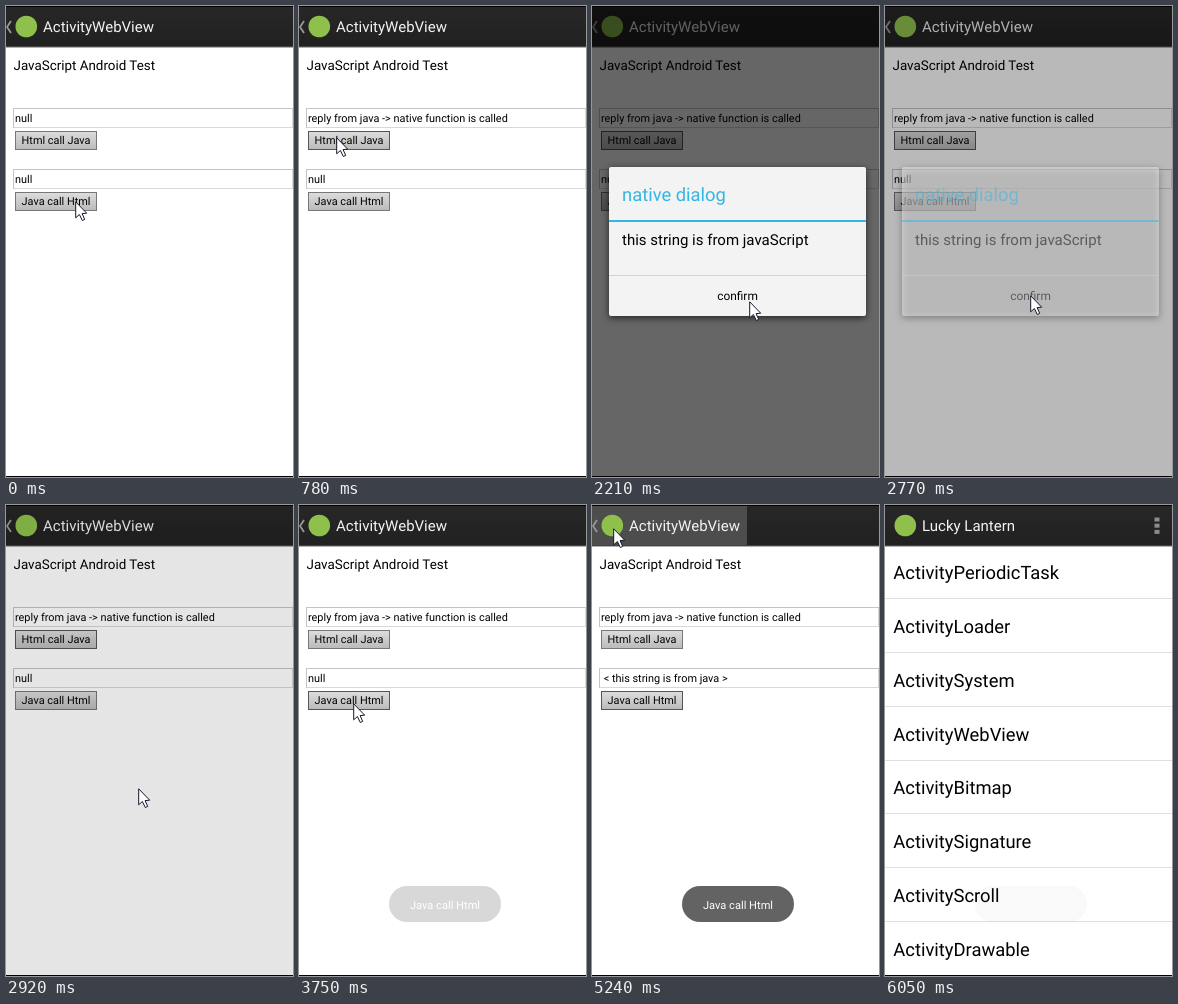
An HTML page with a canvas for the animation above (6.33 s loop, 287 by 471 pixels).

```html
<!DOCTYPE html>
<html lang="en">
<head>
<meta charset="utf-8">
<title>WebView bridge demo</title>
<style>
  html, body { margin: 0; width: 100%; height: 100%; overflow: hidden; background: #fff; }
  canvas { display: block; width: 287px; height: 471px; }
</style>
</head>
<body>
<canvas id="stage" width="287" height="471"></canvas>
<script>
const W = 287, H = 471, LOOP = 6330, STEP = 120;
const ctx = document.getElementById('stage').getContext('2d');
ctx.textRendering = 'geometricPrecision';

const activities = ['PeriodicTask', 'Loader', 'System', 'WebView', 'Bitmap', 'Signature', 'Scroll', 'Drawable'];

// Where the pointer rests, when it sets off for that place and in how many hops
const home = { x: 69, y: 195 };
const moves = [
  { at: 120, hops: 2, x: 37, y: 131 },
  { at: 1670, hops: 2, x: 175, y: 289 },
  { at: 1940, hops: 3, x: 157, y: 295 },
  { at: 2770, hops: 2, x: 132, y: 283 },
  { at: 3070, hops: 3, x: 54, y: 198 },
  { at: 4570, hops: 3, x: 9, y: 46 },
  { at: 4960, hops: 1, x: 21, y: 23 },
  { at: 5540, hops: 2, x: 238, y: 421 }
];

// Rises from 0 to 1 in equal steps, the first one taken at `start`
function ramp(t, start, steps) {
  const taken = Math.floor((t - start) / STEP) + 1;
  return Math.min(1, Math.max(0, taken / steps));
}

function pointerAt(t) {
  let { x, y } = home;
  for (const move of moves) {
    const p = ramp(t, move.at, move.hops);
    x += (move.x - x) * p;
    y += (move.y - y) * p;
  }
  return [Math.round(x), Math.round(y)];
}

function rect(x, y, w, h, fill) {
  ctx.fillStyle = fill;
  ctx.fillRect(x, y, w, h);
}

function roundRect(x, y, w, h, radius, fill) {
  ctx.beginPath();
  ctx.roundRect(x, y, w, h, radius);
  ctx.fillStyle = fill;
  ctx.fill();
}

function text(str, x, baseline, size, fill = '#000', align = 'left') {
  ctx.font = `${size}px Roboto, sans-serif`;
  ctx.textAlign = align;
  ctx.fillStyle = fill;
  ctx.fillText(str, x, baseline);
}

function gradient(y, h, top, bottom) {
  const g = ctx.createLinearGradient(0, y, 0, y + h);
  g.addColorStop(0, top);
  g.addColorStop(1, bottom);
  return g;
}

function polyline(points) {
  ctx.beginPath();
  points.forEach(([x, y]) => ctx.lineTo(x, y));
}

function header(title, pressed) {
  rect(0, 0, W, 1, '#000');
  rect(0, 1, W, 39, gradient(1, 39, '#272727', '#212121'));
  rect(0, 40, W, 1, '#444');
  rect(0, 41, W, 1, '#b0b0b0');
  if (pressed) rect(0, 1, 155, 39, '#4d4d4d');
  text(title, 37, 26, 15, '#f3f3f3');
  ctx.beginPath();
  ctx.arc(20.3, 20.5, 10.8, 0, Math.PI * 2);
  ctx.fillStyle = '#8fc04c';
  ctx.fill();
}

function input(y, value) {
  rect(7, y, 280, 20, '#d8d8d8');
  rect(7, y, 280, 1, '#c4c4c4');
  rect(7, y, 1, 20, '#c4c4c4');
  rect(8, y + 1, 278, 18, '#fff');
  text(value, 9, y + 14, 10.9);
}

function button(y, label, focused) {
  rect(9, y, 82, 19, focused ? '#555' : '#777');
  rect(10, y + 1, 80, 17, gradient(y, 19, '#dedede', '#b9b9b9'));
  text(label, 50, y + 13.4, 10.9, '#000', 'center');
}

function webPage(t) {
  header('ActivityWebView', t >= 5240);
  polyline([[5, 15], [1, 21], [5, 27]]);
  ctx.strokeStyle = '#999';
  ctx.lineWidth = 1.8;
  ctx.stroke();

  text('JavaScript Android Test', 7.5, 64, 13.4);
  input(102, t < 780 ? 'null' : 'reply from java -> native function is called');
  button(125, 'Html call Java', t >= 780 && t < 3750);
  input(163, t < 3900 ? 'null' : ' < this string is from java >');
  button(186, 'Java call Html', t >= 3750);
}

function listPage() {
  header('Lucky Lantern');
  for (let i = 0; i < 3; i++) rect(269.5, 12.5 + i * 6.2, 5, 4, '#8c8c8c');
  activities.forEach((name, i) => {
    const offset = i * 53.85;
    text('Activity' + name, 8.3, 74 + offset, 18.4);
    rect(0, Math.round(93 + offset), W, 1, '#e0e0e0');
  });
}

function dialog(alpha) {
  ctx.save();
  ctx.globalAlpha = alpha;
  ctx.shadowColor = 'rgba(0,0,0,.65)';
  ctx.shadowBlur = 7;
  ctx.shadowOffsetY = 2;
  roundRect(17, 161, 257, 149, 2, '#f3f3f3');
  ctx.shadowColor = 'transparent';
  text('native dialog', 30, 195, 18.4, '#33b5e5');
  rect(17, 214, 257, 2, '#33b5e5');
  text('this string is from javaScript', 30, 239, 15);
  rect(17, 269, 257, 1, '#d2d2d2');
  text('confirm', 145.5, 294, 11.9, '#000', 'center');
  ctx.restore();
}

// The label stays white while the pill is still pale
function toast(alpha) {
  ctx.save();
  ctx.globalAlpha = alpha;
  roundRect(90, 381, 112, 36, 18, '#636363');
  ctx.globalAlpha = Math.min(1, alpha * 4);
  text('Java call Html', 146, 403.5, 11.1, '#fff', 'center');
  ctx.restore();
}

function pointer(x, y) {
  ctx.save();
  ctx.translate(x + .7, y + .8);
  polyline([[0, 0], [0, 16], [3.7, 12.7], [6.6, 18.7], [9, 17.6], [6.4, 11.8], [11, 11.4]]);
  ctx.closePath();
  ctx.fillStyle = '#fff';
  ctx.fill();
  ctx.strokeStyle = '#15152c';
  ctx.lineWidth = 1;
  ctx.stroke();
  ctx.restore();
}

function render(t) {
  const opening = ramp(t, 930, 2);
  const dim = .6 * opening * (1 - ramp(t, 2770, 5)) ** 3.5;

  rect(0, 0, W, H, '#fff');
  if (t < 5390) webPage(t);
  else listPage();
  rect(0, 0, W, H, `rgba(0,0,0,${dim.toFixed(3)})`);
  dialog(opening * (1 - ramp(t, 2770, 2)));
  toast(ramp(t, 3750, 4) * (1 - .96 * ramp(t, 5810, 3)));
  rect(0, H - 1, W, 1, '#000');
  if (t < 5810) pointer(...pointerAt(t));
}

const start = performance.now();
function frame() {
  render((performance.now() - start) % LOOP);
  requestAnimationFrame(frame);
}
frame();
</script>
</body>
</html>
```
